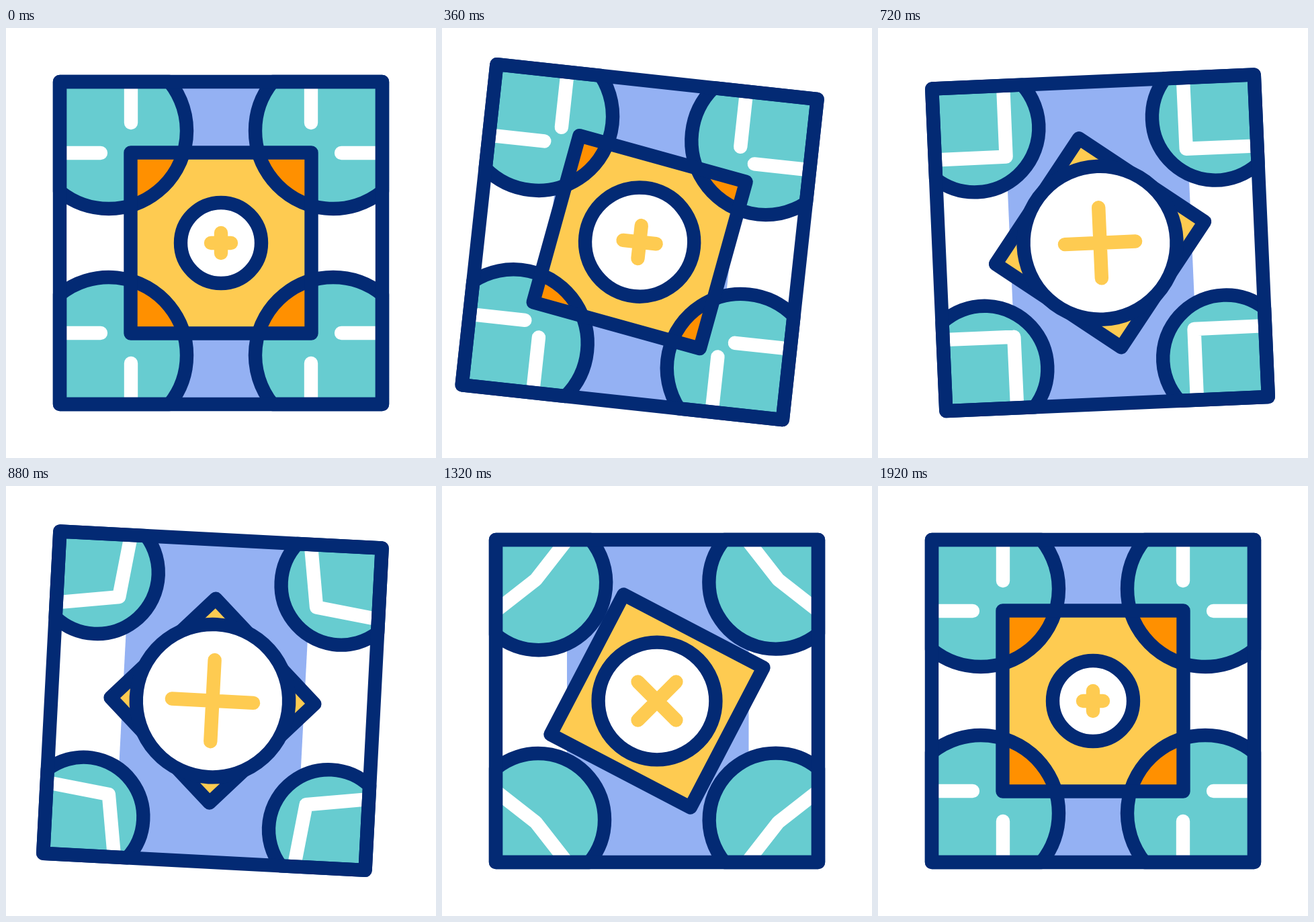
Write an HTML page with a canvas that moves like this. It is 640 px wide and 640 px high and loops after 2000 ms.

```html
<!DOCTYPE html>
<html lang="en">
<head>
<meta charset="utf-8">
<title>Swinging tile</title>
<style>
html, body { margin: 0; width: 100%; height: 100%; overflow: hidden; background: #fff; }
canvas { display: block; width: 100vw; height: 100vh; }
</style>
</head>
<body>
<canvas id="stage" width="640" height="640"></canvas>
<script>
const ctx = document.getElementById('stage').getContext('2d');
const NAVY = '#032a74', TEAL = '#67ccd0', BLUE = '#94b1f3';
const YELLOW = '#fecb51', ORANGE = '#ff9000', WHITE = '#fff';
const LOOP = 2000, STEP = 40, HALF = 240;

// Corner signs and how far each corner disc shrinks
const CORNERS = [[-1, -1, 40.5], [1, -1, 43], [1, 1, 43.5], [-1, 1, 44]];
const SWING = [[100, 0], [317, 7], [600, -6], [883, 3], [1100, 0]];

const rad = deg => deg * Math.PI / 180;
const mix = (a, b, p) => a + (b - a) * p;

function ease(t, from, to) {
  const u = Math.min(1, Math.max(0, (t - from) / (to - from)));
  return u * u * (3 - 2 * u);
}

// Rises from a to b, rests, falls back from c to d
const pulse = (t, a, b, c, d) => Math.min(ease(t, a, b), 1 - ease(t, c, d));

function swingAngle(t) {
  let angle = 0;
  for (let i = 1; i < SWING.length; i++) {
    const [t0, a0] = SWING[i - 1], [t1, a1] = SWING[i];
    angle += (a1 - a0) * ease(t, t0, t1);
  }
  return angle;
}

function fill(path, color) {
  ctx.fillStyle = color;
  ctx.fill(path);
}

function stroke(path, color) {
  ctx.strokeStyle = color;
  ctx.stroke(path);
}

function square(half, angle = 0) {
  const path = new Path2D(), r = half * Math.SQRT2;
  for (let i = 0; i < 4; i++) {
    const a = rad(angle + 45 + 90 * i);
    path.lineTo(r * Math.cos(a), r * Math.sin(a));
  }
  path.closePath();
  return path;
}

function disc(r) {
  const path = new Path2D();
  path.arc(0, 0, r, 0, 2 * Math.PI);
  return path;
}

// The part of a corner disc inside the tile, closed by the tile's edges
function cornerDisc([sx, sy, shrink], turn) {
  const d = 73 - 0.366 * shrink * turn;
  const r = 116 - 0.634 * shrink * turn;
  const a = Math.asin(d / r);
  const path = new Path2D();
  const from = sx * sy > 0 ? -a : Math.PI / 2 - a;
  const flip = sx < 0 ? 0 : Math.PI;
  const side = sx * sy > 0 ? from + flip : from + Math.PI - flip - Math.PI / 2 * 2 + Math.PI;
  path.arc(sx * (HALF - d), sy * (HALF - d), r, side, side + Math.PI / 2 + 2 * a);
  path.lineTo(sx * HALF, sy * HALF);
  path.closePath();
  return path;
}

// Two strokes growing from the tile edges towards a shared bend
function cornerLines([sx, sy], bend, length) {
  const path = new Path2D();
  const x = mix(-134, bend, length), y = mix(-HALF, bend, length);
  path.moveTo(sx * 134, sy * HALF);
  path.lineTo(sx * -x, sy * -y);
  path.moveTo(sx * HALF, sy * 134);
  path.lineTo(sx * -y, sy * -x);
  return path;
}

function plus(half, angle) {
  const path = new Path2D();
  const x = half * Math.cos(rad(angle)), y = half * Math.sin(rad(angle));
  path.moveTo(-x, -y);
  path.lineTo(x, y);
  path.moveTo(y, -x);
  path.lineTo(-y, x);
  return path;
}

function draw(t) {
  const turn = pulse(t, 110, 964, 962, 1806);
  const tile = square(HALF);
  const inner = square(mix(134.5, 106.7, turn), 45 * turn);
  const hub = disc(mix(60, 114, pulse(t, 122, 680, 840, 1810)));
  const bend = -134 - 46.5 * pulse(t, 700, 1214, 1437, 1910);
  const length = mix(0.575, 1, pulse(t, 115, 615, 1310, 1905));
  const arms = mix(15, 62, pulse(t, 110, 965, 855, 1833));
  const spin = 45 * pulse(t, 960, 1322, 1450, 1910);
  const discs = CORNERS.map(c => cornerDisc(c, turn));

  ctx.setTransform(1, 0, 0, 1, 0, 0);
  ctx.fillStyle = WHITE;
  ctx.fillRect(0, 0, 640, 640);
  ctx.lineWidth = 20.4;
  ctx.lineCap = ctx.lineJoin = 'round';

  // The tile hangs from the middle of its top edge
  ctx.translate(320, 80);
  ctx.rotate(rad(swingAngle(t)));
  ctx.translate(0, HALF);

  ctx.fillStyle = BLUE;
  ctx.fillRect(-134, -HALF, 270.5, 2 * HALF);
  discs.forEach(d => fill(d, TEAL));
  fill(inner, YELLOW);
  ctx.save();
  ctx.clip(inner);
  discs.forEach(d => fill(d, ORANGE));
  ctx.restore();

  CORNERS.forEach(c => stroke(cornerLines(c, bend, length), WHITE));
  discs.forEach(d => stroke(d, NAVY));
  stroke(inner, NAVY);
  fill(hub, WHITE);
  stroke(hub, NAVY);
  stroke(plus(arms, spin), YELLOW);
  stroke(tile, NAVY);
}

const start = performance.now();
function frame() {
  const t = (performance.now() - start) % LOOP;
  draw(Math.floor(t / STEP) * STEP);
  requestAnimationFrame(frame);
}
frame();
</script>
</body>
</html>
```
